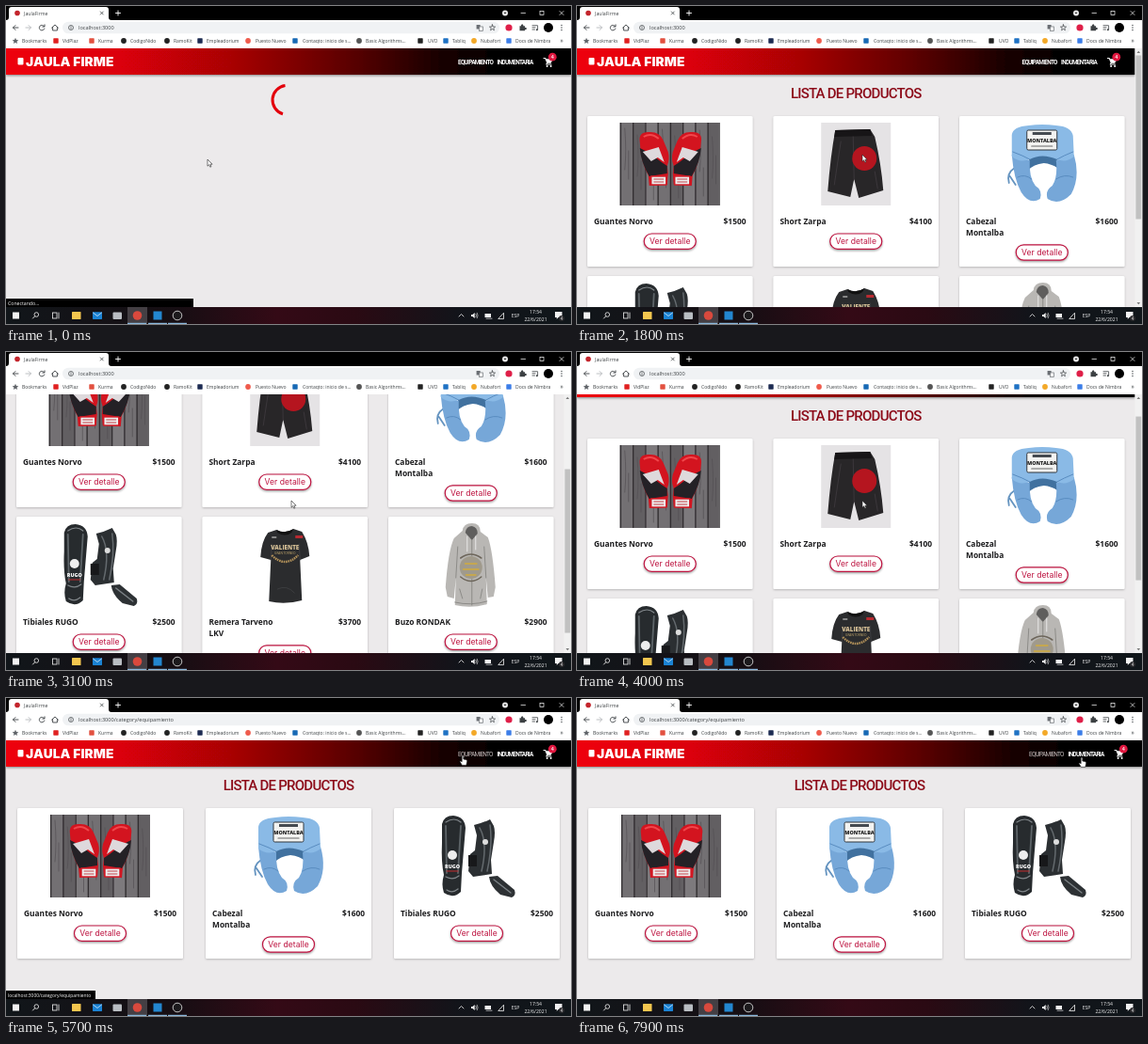
Recreate the animation shown at these times as an HTML page. Size 600 by 338 pixels, loop 8000 ms.

```html
<!DOCTYPE html>
<html lang="es">
<head>
<meta charset="utf-8">
<style>
  html, body { margin: 0; width: 100%; height: 100%; overflow: hidden; background: #eceaeb; }
  svg { display: block; width: 100vw; height: 100vh; }
  text { font-family: "Open Sans", "Noto Sans", sans-serif; white-space: pre; }
  .brand { font-family: Inter, "Open Sans", sans-serif; font-weight: 900; letter-spacing: .1px; }
  .nav { font-family: Roboto, sans-serif; font-weight: 700; letter-spacing: -.7px; }
  .chosen .gear { font-weight: 400; fill: #c9c2c2; }
  .heading { font-family: Roboto, sans-serif; font-weight: 500; letter-spacing: -.75px; }
  .name { font-family: "Noto Sans", "Open Sans", sans-serif; font-weight: 700; }
  .btn { font-family: Inter, sans-serif; }
</style>
</head>
<body>
<svg id="stage" viewBox="0 0 600 338" preserveAspectRatio="none" xmlns="http://www.w3.org/2000/svg"></svg>
<script>
const LOOP = 8000, STEP = 100;
const LOADED = 1300, CLICK = 5200, SWAP = 5500;
const INK = '#3c4043', CRIMSON = '#bd1440';

// Markup helpers
const rect = (x, y, w, h, fill, more = '') =>
  `<rect x="${x}" y="${y}" width="${w}" height="${h}" fill="${fill}" ${more}/>`;
const dot = (x, y, r, fill, more = '') => `<circle cx="${x}" cy="${y}" r="${r}" fill="${fill}" ${more}/>`;
const shape = (d, fill, more = '') => `<path d="${d}" fill="${fill}" ${more}/>`;
const line = (d, color, w = 1) =>
  shape(d, 'none', `stroke="${color}" stroke-width="${w}" stroke-linecap="round" stroke-linejoin="round"`);
const text = (x, y, size, str, fill, more = '') =>
  `<text x="${x}" y="${y}" font-size="${size}" fill="${fill}" ${more}>${str}</text>`;
const group = (x, y, body, more = '') => `<g transform="translate(${x} ${y})" ${more}>${body}</g>`;
const MID = 'text-anchor="middle"', END = 'text-anchor="end"';

// Product pictures: x is centred on 0, y runs from 0 to 88
function gloves() {
  let wood = rect(-53, 0, 106, 88, '#6f6c6f');
  for (let i = 0; i < 8; i++) {
    const x = -53 + i * 13.25;
    wood += rect(x, 0, 13.25, 88, ['#737073', '#625f62', '#7d7a7d'][i % 3]) +
      rect(x, 0, 1.3, 88, '#312d30') +
      line(`M${x + 5},${6 + i * 7 % 20} q2,24 0,44 M${x + 9},${30 + i * 11 % 24} v30`, '#535054', .7);
  }
  const one =
    shape('M-32,21Q-34,10 -23,10Q-11,9 -7,19L-2,31Q0,39 -3,46L-2,54L-3,66L-22,67L-23,56Q-31,42 -32,21Z', '#d3141f') +
    shape('M-32,27L-22,32L-9,42L-3,46L-3,54L-22,57Q-31,42 -32,27Z', '#242126') +
    shape('M-29,31L-12,26L-6,42L-13,37L-20,41Z', '#ded9dc') +
    shape('M-28,15Q-20,10 -12,17', 'none', 'stroke="#f0474c" stroke-width="2"') +
    rect(-20, 57, 16, 9, '#eee', 'stroke="#cf1a25" stroke-width="1.4"') +
    line('M-17,60h10M-17,63h10', '#bb2a32', .9);
  return wood + one + `<g transform="translate(1 0) scale(-1 1)">${one}</g>`;
}

function shorts() {
  return rect(-37, 0, 74, 88, '#e5e3e5') +
    shape('M-22,8L15,7L20,15Q27,45 29,72L3,80L-2,60L-6,79L-30,73Q-27,35 -22,8Z', '#282628') +
    shape('M-22,8L15,7L17,14L-23,15Z', '#171517') +
    line('M-3,15L-2,60M-16,20Q-20,45 -23,66M20,52L23,70', '#403c40', .8) +
    dot(9, 38, 13, '#b5151f');
}

function headgear() {
  return line('M-29,48Q-38,54 -35,64M-34,57L-28,66', '#6594c0', 1.8) +
    shape('M-13,33H15L19,50Q12,44 2,43Q-9,44 -15,51Z', '#41719f') +
    shape('M-32,34Q-30,60 -22,74Q-13,88 -2,81Q1,72 -7,67Q-14,58 -13,40Z', '#76a7d8') +
    shape('M34,34Q41,58 31,76Q18,89 6,81Q3,72 11,67Q17,58 15,40Z', '#76a7d8') +
    shape('M-32,13Q-31,4 -14,3Q0,1 15,3Q31,4 33,14L34,36Q26,43 16,39Q0,32 -13,39Q-24,43 -32,36Z', '#8abae6') +
    line('M-31,31Q-20,35 -13,39M33,31Q23,35 16,39M-26,58Q-18,54 -11,60M33,58Q24,54 15,60', '#598cc0', 1) +
    rect(-16, 8, 32, 21, '#f3f3f1', 'rx="1.5" stroke="#30363d" stroke-width="1"') +
    rect(-10, 10, 20, 3, '#454a50') +
    text(0, 21, 5.4, 'MONTALBA', '#222', `${MID} font-weight="800"`) +
    line('M-11,25H11', '#666', 1.2);
}

function guards() {
  return shape('M-37,10Q-35,1 -25,1Q-13,2 -12,14L-14,38L-16,62L-17,82Q-25,90 -35,83Q-38,74 -35,64Q-38,50 -37,30Z', '#272b2e') +
    line('M-33,12L-32,62M-17,12L-20,62', '#5d6468', 1.8) + line('M-33,8Q-24,2 -17,8M-33,66Q-25,70 -19,65M-32,80Q-26,84 -20,79', '#80868a', 1.2) +
    dot(-26, 43, 5, '#eee') +
    text(-26, 57, 5.4, 'RUGO', '#fff', `${MID} font-weight="800"`) +
    line('M-32,60H-20', '#c32a2d', 1) +
    shape('M-3,11Q6,9 14,5L18,12Q20,18 18,29L15,48L16,63L-4,66L-9,60L-7,42L-2,38L0,22Z', '#2b2f32') +
    line('M3,14Q12,30 5,60M14,11Q17,32 11,60', '#646a6e', 1.5) +
    rect(-9, 43, 9, 12, '#17181a') + dot(9, 29, 3, '#ddd') +
    shape('M13,66L22,65L40,80Q42,86 37,88L25,85Q14,76 13,66Z', '#2d3134') +
    line('M18,69L36,83', '#7b8185', 1.4);
}

function shirt() {
  return shape('M-9,7Q0,12 9,6L18,9Q25,20 26,35L16,39L18,82Q0,87 -17,83L-15,39L-26,36Q-25,19 -18,10Z', '#2b2c2e') +
    shape('M-9,7Q0,12 9,6L7,10Q0,15 -8,10Z', '#111') +
    line('M-15,39L-14,22M16,39L15,22M-8,70Q2,65 10,74', '#414245', .8) +
    rect(11, 13, 8, 3, '#b92a31') + rect(-14, 14, 5, 2, '#888') +
    text(0, 28, 6.2, 'VALIENTE', '#d7c197', `${MID} font-weight="800"`) +
    text(0, 33, 3.2, 'GRAN TORNEO', '#c4a96d', MID) +
    shape('M-14,34Q0,48 14,34', 'none', 'stroke="#b3925a" stroke-width="2.4" stroke-dasharray="1.6 .8"');
}

function hoodie() {
  return shape('M-9,8Q-8,0 1,0Q10,0 10,9L18,15Q23,28 26,68L24,78L18,79L16,58L17,86Q0,91 -17,87L-16,58L-18,80L-25,78L-27,68Q-24,28 -18,16Z', '#b9b7b4') +
    shape('M-6,10Q-5,3 1,3Q7,4 7,11L1,18Z', '#5f5e5d') +
    line('M1,18V87M-16,58L-14,25M16,58L14,25M-12,70L-9,80M12,70L10,80M-17,84Q0,88 17,83', '#878683', .9) +
    line('M-4,14V30M5,14V28', '#eee', .9) +
    dot(0, 47, 12, '#a09a8c') +
    line('M-11,37Q0,29 11,37M-11,57Q0,66 11,57', '#6d665b', 1.6) +
    line('M-6,43H6M-8,49H8M-5,55H5', '#c5a750', 1.8);
}

const ITEMS = {
  gloves: [gloves, 1500, 'Guantes Norvo'],
  shorts: [shorts, 4100, 'Short Zarpa'],
  headgear: [headgear, 1600, 'Cabezal', 'Montalba'],
  guards: [guards, 2500, 'Tibiales RUGO'],
  shirt: [shirt, 3700, 'Remera Tarveno', 'LKV'],
  hoodie: [hoodie, 2900, 'Buzo RONDAK']
};

function card(key, x, y, w) {
  const [draw, price, ...names] = ITEMS[key], mid = w / 2;
  const by = names.length > 1 ? 136.8 : 125;
  return group(x, y,
    rect(0, 0, w, 160, '#fff', 'rx="1.5" filter="url(#soft)"') +
    group(mid, 7, draw()) +
    names.map((n, i) => text(7, 115 + i * 11.8, 8.4, n, '#1c1c1e', 'class="name"')).join('') +
    text(w - 7, 115, 8.4, '$' + price, '#1c1c1e', `class="name" ${END}`) +
    rect(mid - 27.5, by, 55, 16.3, '#fff', `rx="8.1" stroke="${CRIMSON}" stroke-width="1.2" filter="url(#drop)"`) +
    text(mid, by + 11.3, 8.6, 'Ver detalle', CRIMSON, `class="btn" ${MID}`));
}

function header(w) {
  return rect(0, 45, w, 28, 'url(#bar)', 'filter="url(#drop)"') +
    rect(12.5, 55, 6, 7.5, '#fff', 'rx="1"') +
    text(21, 64.2, 13.7, 'JAULA FIRME', '#fff', 'class="brand"') +
    group(w - 600, 0,
      text(480, 62, 6.4, 'EQUIPAMIENTO', '#fff', 'class="nav gear"') +
      text(521.5, 62, 6.4, 'INDUMENTARIA', '#fff', 'class="nav"') +
      line('M571,55.5H572.7L574.8,60.3H578.3L580,57M574.8,60.3L573.8,62H579', '#fff', 1.1) +
      shape('M573.3,56.3H580L578.2,60.3H575Z', '#fff') +
      dot(574.6, 64, 1, '#fff') + dot(578.6, 64, 1, '#fff') +
      dot(580.3, 54.2, 4.4, '#e0173f') +
      text(580.3, 56.2, 5.4, '4', '#fff', `${MID} font-weight="600"`));
}

function page(w, keys) {
  const gap = w / 3, left = w === 600 ? 12 : 11, cw = gap - 2 * left;
  return text(w / 2, 97.6, 15, 'LISTA DE PRODUCTOS', '#8c0a18', `class="heading" ${MID}`) +
    keys.map((k, i) => card(k, left + (i % 3) * gap, 117 + Math.floor(i / 3) * 170, cw)).join('') +
    header(w);
}

function browser() {
  const marks = [
    [53, 60, 'VidPlaz', '#e02020', 1], [91, 98, 'Kurma', '#e2503f', 1], [125, 132, 'CodigoNido', '#222'],
    [171, 178, 'RamoKit', '#222'], [206, 213, 'Empleadorium', '#1d2b52', 1], [257, 265, 'Puesto Nuevo', '#ef5b4c'],
    [307, 315, 'Contaqto: inicio de s...', '#1769b5', 1], [375, 382, 'Basic Algorithms...', '#555'],
    [440, 448, 'UVO', '#222', 1], [467, 474, 'Tabliq', '#1f72c4', 1], [497, 504, 'Nubafort', '#f3a928'],
    [534, 541, 'Docs de Nimbra', '#3b7de8', 1]
  ];
  return rect(0, 0, 600, 15, '#000') + rect(0, 15, 600, 30, '#fff') +
    shape('M0,15Q3,15 3,12V4Q3,1 6,1H106Q109,1 109,4V12Q109,15 112,15Z', '#fff') +
    dot(12, 7.5, 2.8, '#c3242b') + text(19, 9.6, 5.2, 'JaulaFirme', INK) +
    line('M100.3,6L103.3,9M103.3,6L100.3,9', INK, .8) +
    line('M116.5,7.5H121.5M119,5V10', '#fff', .9) +
    dot(530, 7.5, 3, '#e8e8e8') + shape('M528.6,6.8H531.4L530,8.6Z', '#111') +
    line('M547,7.5H551.5M588,5.5L592,9.5M592,5.5L588,9.5', '#fff', .7) +
    rect(567, 5.5, 4, 4, 'none', 'stroke="#fff" stroke-width=".7"') +
    line('M13,23H7.5M10,20.5L7.5,23L10,25.5', INK, .9) +
    line('M21,23H26.5M24,20.5L26.5,23L24,25.5', '#b5b8bc', .9) +
    line('M40.5,21.6A2.8,2.8 0 1 0 40.8,24M41,19.8V22H38.8', INK, .9) +
    line('M48.5,23.2L52,20L55.5,23.2M49.6,22.5V26H54.4V22.5', INK, .9) +
    rect(60, 16.7, 464, 12.6, '#f0f2f4', 'rx="6.3"') +
    dot(69, 23, 2.5, 'none', `stroke="${INK}" stroke-width=".7"`) + line('M69,22.8V24.2M69,21.7V21.7', INK, .7) +
    rect(499.6, 20, 4, 4.5, '#6a6e73') + rect(502.5, 22, 4, 4.5, '#fff', 'stroke="#6a6e73" stroke-width=".7"') +
    line('M516.5,19.8L517.3,22L519.6,22.1L517.8,23.5L518.4,25.8L516.5,24.5L514.6,25.8L515.2,23.5L513.4,22.1L515.7,22Z', INK, .7) +
    dot(534, 23, 3.6, '#df1f48') +
    shape('M545.5,21.2H547.2A1.2,1.2 0 1 1 549.2,21.2H551V23A1.2,1.2 0 1 1 551,25V26.3H545.5Z', INK) +
    line('M559,20.7H564M559,22.8H562M559,25H561.5M564.6,21V25', INK, .8) + dot(563.8, 25.2, 1, INK) +
    dot(576, 23, 5, '#000') + [20.5, 23, 25.5].map(y => dot(590, y, .7, INK)).join('') +
    shape('M10,33.7L11,36L13.3,36.2L11.5,37.7L12.1,40L10,38.8L7.9,40L8.5,37.7L6.7,36.2L9,36Z', '#5f6368') +
    text(17, 38.8, 5, 'Bookmarks', INK) +
    marks.map(([ix, tx, label, color, square]) =>
      (square ? rect(ix - 2.7, 34.3, 5.4, 5.4, color, 'rx=".6"') : dot(ix, 37, 2.9, color)) +
      text(tx, 38.8, 5, label, INK)).join('') +
    text(590, 39, 6.5, '»', INK, MID);
}

function taskbar() {
  const white = '#f2f2f2';
  return rect(0, 320, 600, 18, 'url(#task)') +
    rect(129, 320, 21, 18, '#443f44') +
    [129, 151, 172].map(x => rect(x, 336.8, 20, 1.2, '#8bb9dd')).join('') +
    rect(7, 325.5, 7, 7, white) +
    dot(32.3, 328, 2.3, 'none', `stroke="${white}" stroke-width=".8"`) + line('M30.6,329.8L28.5,332', white, .9) +
    rect(49.5, 326, 4.5, 6, 'none', `stroke="${white}" stroke-width=".8"`) + line('M56,326V332', white, .8) +
    rect(70, 325, 9.5, 8, '#f3c64f', 'rx=".6"') + rect(92, 325.3, 10, 7.6, '#1b82d3', 'rx=".6"') +
    line('M92.5,326L97,329.5L101.5,326', '#d4eafc', .8) +
    rect(113.5, 325.5, 9.5, 7.5, '#b9bdc2', 'rx="1"') +
    dot(139.5, 329, 4.8, '#d9493d') + rect(156.5, 324.5, 9, 9, '#2387d0') +
    dot(182, 329, 4.8, '#1c1a1d', 'stroke="#d5d5d5" stroke-width=".9"') +
    line('M481,330L483.5,327.5L486,330', white, .8) +
    shape('M494,328H495.5L497.7,326V332L495.5,330H494Z', white) + line('M499,327.3Q500.2,329 499,330.7M500.3,326.2Q502,329 500.3,331.8', white, .6) +
    rect(508.5, 327, 6.5, 4, white) + line('M510,332.2H516', white, .7) +
    line('M523,332.2L528.5,326.2V332.2Z', white, .8) +
    text(541, 331, 5.1, 'ESP', white, MID) +
    text(562.5, 327.2, 5.1, '17:54', white, MID) + text(562.5, 335.2, 5.1, '22/6/2021', white, MID) +
    shape('M583,325H590.5V331H586.5L584.8,333V331H583Z', white) +
    dot(590, 332, 3, '#2a2a2d') + text(590, 333.8, 4.6, '4', white, MID);
}

const status = (id, w, label, size) =>
  `<g id="${id}">${rect(0, 311, w, 9.5, '#000')}${text(2, 317.6, size, label, '#fff')}</g>`;

const gradient = (id, ...stops) =>
  `<linearGradient id="${id}">${stops.map(([at, c]) => `<stop offset="${at}" stop-color="${c}"/>`).join('')}</linearGradient>`;
const shadow = (id, dy, blur, alpha) =>
  `<filter id="${id}" x="-20%" y="-20%" width="140%" height="160%"><feDropShadow dx="0" dy="${dy}" stdDeviation="${blur}" flood-opacity="${alpha}"/></filter>`;

const stage = document.getElementById('stage');
stage.innerHTML = '<defs>' +
  gradient('bar', [0, '#ee0409'], [.2, '#dc0007'], [.4, '#a80006'], [.6, '#5e0004'], [.77, '#180001'], [.88, '#000']) +
  gradient('task', [0, '#11161a'], [.3, '#160e13'], [.48, '#340a16'], [.62, '#2a0a13'], [.8, '#12141a'], [1, '#10161a']) +
  shadow('soft', .8, 1, .25) + shadow('drop', 1.2, 1, .4) + '</defs>' +
  rect(0, 0, 600, 338, '#eceaeb') +
  `<g id="home">${page(592.5, Object.keys(ITEMS))}</g>
   <g id="bars">${rect(592.5, 45, 7.5, 275, '#f1f1f1')}
     ${shape('M594.5,50L596.3,47.8L598.1,50Z', '#777')}${shape('M594.5,315L596.3,317.2L598.1,315Z', '#777')}
     ${rect(593.4, 52.5, 5.8, 174, '#c1c1c1', 'id="thumb"')}</g>
   <g id="category" class="chosen">${page(600, ['gloves', 'headgear', 'guards'])}</g>
   <g id="loading">${header(600)}
     <path id="ring" d="M296.5,84.6A15.5,15.5 0 0 0 294,114.8" fill="none" stroke="#e3000c" stroke-width="3"/></g>` +
  browser() +
  `<text id="url" x="77" y="25" font-size="5.6" fill="${INK}"></text>` +
  status('connecting', 199, 'Conectando...', 5.2) +
  status('link', 95, 'localhost:3000/category/equipamiento', 4.9) +
  taskbar() +
  `<g id="arrow">${shape('M0,0V7.2L1.7,5.7L2.8,8.2L4,7.7L2.9,5.2H5.1Z', '#fff', 'stroke="#222" stroke-width=".6"')}</g>
   <g id="hand">${shape('M-.8,.8Q0,-.6 .8,.8V4L4,4.8Q4.8,5.2 4.6,6.4L3.8,10.4H-.6L-3,6.6Q-2.6,5.4 -.8,6.8Z', '#fff', 'stroke="#222" stroke-width=".6"')}</g>`;

const ui = {};
stage.querySelectorAll('[id]').forEach(n => ui[n.id] = n);

// Rows: time, then values
const SCROLL = [[2600, 0], [2700, 5], [2800, 32], [3100, 112], [3300, 135], [3600, 135], [4000, 25], [4200, 0]];
const POINTER = [[600, 214, 163], [1600, 303, 158], [4300, 303, 158], [4900, 485, 61], [5900, 485, 61],
  [6300, 526, 76], [6700, 440, 130], [7200, 342, 88], [7600, 576, 60], [7900, 536, 63]];

function at(rows, t) {
  const i = rows.findIndex(r => r[0] > t);
  if (i < 1) return (i ? rows[rows.length - 1] : rows[0]).slice(1);
  const a = rows[i - 1], b = rows[i], k = (t - a[0]) / (b[0] - a[0]);
  return a.slice(1).map((v, j) => v + (b[j + 1] - v) * k);
}

const show = (node, on) => node.style.display = on ? '' : 'none';
const between = (t, a, b) => t >= a && t < b;

function render(t) {
  const [scroll] = at(SCROLL, t), [x, y] = at(POINTER, t);
  const home = between(t, LOADED, SWAP), clicked = t >= CLICK;
  show(ui.loading, t < LOADED);
  show(ui.home, home);
  show(ui.bars, home);
  show(ui.category, t >= SWAP);
  ui.home.classList.toggle('chosen', clicked);
  ui.home.setAttribute('transform', `translate(0 ${-scroll})`);
  ui.thumb.setAttribute('y', 52.5 + scroll * .643);
  ui.ring.setAttribute('transform', `rotate(${t / 750 * 360} 298.5 100)`);
  ui.url.textContent = 'localhost:3000' + (clicked ? '/category/equipamiento' : '');
  show(ui.connecting, t < 400);
  show(ui.link, between(t, 4900, 6500));
  const hand = between(t, 4900, 6000) || t >= 7600;
  show(ui.hand, hand);
  show(ui.arrow, !hand);
  (hand ? ui.hand : ui.arrow).setAttribute('transform', `translate(${x} ${y})`);
}

const start = performance.now();
function tick() {
  const t = (performance.now() - start) % LOOP;
  render(Math.floor(t / STEP) * STEP);
  requestAnimationFrame(tick);
}
tick();
</script>
</body>
</html>
```
